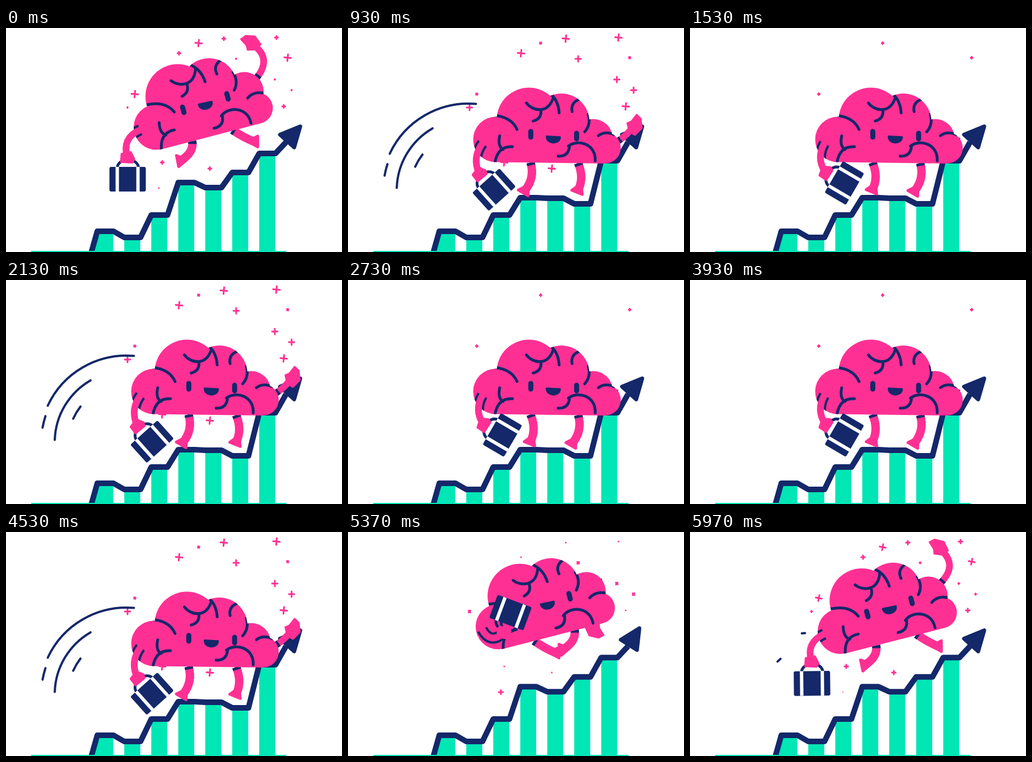
An HTML page with a canvas that plays this animation: 600 by 400 pixels, repeating every 6010 ms.

```html
<!DOCTYPE html>
<html lang="en">
<head>
<meta charset="utf-8">
<title>Running brain</title>
<style>
html, body { margin: 0; width: 100%; height: 100%; overflow: hidden; background: #fff; }
canvas { display: block; width: 600px; height: 400px; }
</style>
</head>
<body>
<canvas id="stage" width="600" height="400"></canvas>
<script>
const ctx = document.getElementById('stage').getContext('2d');
const PINK = '#ff3094', NAVY = '#14286a', GREEN = '#00e6b5';
const LOOP = 6010, CYCLE = 36, RAD = Math.PI / 180;

const mix = (a, b, t) => a + (b - a) * t;
const blend = (a, b, t) => a.map((v, i) => mix(v, b[i], t));

// Each lobe has a centre in the air and on the ground; creases are local to it.
const lobes = [
  { air: [267, 177], ground: [264, 199], r: 40.5, creases: [
    [-17, -40, 16, -47, 32, -27], [5, -8, 6, 11, 17, 14], [32, 5, 7, 10, 9, 39]] },
  { air: [305, 122], ground: [323, 164], r: 57.5, eye: [10, 24], creases: [
    [-12, -28, 0, -18, 30, -16, 32, -50], [25, -55, 42, -47, 49, -26], [16, -23, 22, -8, 8, 0]] },
  { air: [361, 104], ground: [381, 167], r: 50, eye: [33, 18], mouth: [-7, 29], creases: [
    [20, -46, 7, -36, 14, -22], [43, -25, 53, -9, 45, 7]] },
  { air: [424, 113], ground: [438, 197], r: 34.5, creases: [] },
  { air: [447, 143], ground: [459, 214], r: 28, creases: [
    [-17, -18, -7, -30, 10, -27], [-77, 36, -59, 32, -62, 14], [-64, 14, -52, -3, -17, -3, -11, 27]] }
];
const joints = {
  armL: [[238, 182], [240, 206]], armR: [[446, 89], [482, 202]],
  legL: [[331, 202], [326, 240]], legR: [[403, 182], [411, 241]]
};
const barTops = [363, 374, 334, 276, 285, 258, 224];
const barDips = [0, 0, 0, 27, 19, 56, 13];

// x, y and the frame at which the sparkle is largest
const sparkles = [
  [344, 27, 1], [503, 53, 1], [230, 118, 1],
  [389, 19, 29], [483, 17, 29], [309, 45, 29], [496, 140, 29], [279, 240, 29], [364, 251, 29],
  [411, 55, 25], [480, 92, 25], [510, 111, 25], [217, 142, 25],
  [273, 286, 12]
];

// Everything about the stride that follows from the frame alone
function stride(f) {
  const wave = Math.cos(f * 10 * RAD);
  const land = Math.sin((f - 1) * 10 * RAD) ** 4;
  const air = 1 - land;
  return { f, wave, land, air, dx: 1.5 * air, dy: -4.2 * (1 - wave) * air };
}

function joint(s, name) {
  const [x, y] = blend(...joints[name], s.land);
  return [x + s.dx, y + s.dy];
}

function poly(pts, color, round) {
  ctx.beginPath();
  pts.forEach(p => ctx.lineTo(p[0], p[1]));
  ctx.closePath();
  ctx.fillStyle = ctx.strokeStyle = color;
  ctx.fill();
  if (round) { ctx.lineWidth = round; ctx.stroke(); }
}

function curve(p, color, width, cap = 'round', dash = []) {
  ctx.beginPath();
  ctx.moveTo(p[0], p[1]);
  if (p.length === 8) ctx.bezierCurveTo(...p.slice(2));
  else ctx.quadraticCurveTo(...p.slice(2));
  ctx.strokeStyle = color;
  ctx.lineWidth = width;
  ctx.lineCap = cap;
  ctx.setLineDash(dash);
  ctx.stroke();
  ctx.setLineDash([]);
}

function at(x, y, deg, draw) {
  ctx.save();
  ctx.translate(x, y);
  ctx.rotate(deg * RAD);
  draw();
  ctx.restore();
}

function drawSparkles(f) {
  ctx.strokeStyle = PINK;
  ctx.lineCap = 'round';
  for (const [x, y, peak] of sparkles) {
    const d = (f - peak + CYCLE * 1.5) % CYCLE - CYCLE / 2;
    const size = 8 * (1 - Math.abs(d) / 15);
    if (size < .3) continue;
    const w = Math.min(3, size), r = Math.max(.1, size - w / 2);
    at(x, y, Math.max(0, -d) * 5.5, () => {
      ctx.lineWidth = w;
      ctx.beginPath();
      ctx.moveTo(-r, 0); ctx.lineTo(r, 0);
      ctx.moveTo(0, -r); ctx.lineTo(0, r);
      ctx.stroke();
    });
  }
}

function drawChart({ wave, land, air }) {
  const line = [[152, 402]];
  barTops.forEach((top, i) => {
    const x = 163 + i * 48.2, y = top + land * barDips[i];
    poly([[x, y], [x + 28.5, y], [x + 28.5, 399], [i ? x : 154, 399]], GREEN);
    line.push([x, y], [x + 29, y]);
  });
  line.push([500, 204]);
  ctx.beginPath();
  line.forEach(p => ctx.lineTo(p[0], p[1]));
  ctx.strokeStyle = NAVY;
  ctx.lineWidth = 10;
  ctx.lineCap = 'butt';
  ctx.stroke();
  at(500, 204, -48 - 5 * (1 - wave) * air, () => poly([[3, -17], [38, 0], [3, 17]], NAVY, 7));
  ctx.fillRect(45, 398, 456, 2);
}

// Arcs left by the bag: they sweep out, then shrink inwards as they fade.
function drawSwoosh(f) {
  if (f < 20) return;
  const grow = Math.min(1, (f - 19) / 8), out = Math.max(0, (f - 28) / 7);
  const arc = (r, from, span, rest) => {
    const len = mix(span * grow, rest, out);
    if (len <= 0) return;
    ctx.beginPath();
    ctx.arc(215, 290, r - 45 * out, (from - 10 * out) * RAD, (from - 10 * out - len) * RAD, true);
    ctx.strokeStyle = NAVY;
    ctx.lineWidth = 4;
    ctx.lineCap = 'round';
    ctx.stroke();
  };
  arc(155, 275, 70, 3);
  arc(128, 240, 58, 5);
  arc(104, 218, 14, -4);
  arc(152, 198, 8, -4);
}

// side is 1 for the left leg and -1 for the right, half a cycle apart.
function drawLeg(s, name, side) {
  const [x, y] = joint(s, name), w = s.wave * side;
  const fx = 9 - 30 * w - 14 * s.land, fy = 28 + 7 * w + 21 * s.land;
  const p = [x, y, x + fx / 2 + 7 + 7 * w + 5 * s.land, y + fy / 2 + 3, x + fx, y + fy];
  curve(p, PINK, 15, 'butt');
  curve(p, NAVY, 15, 'butt', [5, 999]);
  at(x + fx, y + fy, 25 * w - 3 - 28 * s.land, () => poly([[-10, -6], [10, -6], [1, 11]], PINK, 5));
}

// Curve from the shoulder to a hand at the given angle and reach
function armPath([x, y], deg, reach, bend) {
  const c = Math.cos(deg * RAD), n = Math.sin(deg * RAD);
  return [x, y, x + c * reach / 2 - n * bend, y + n * reach / 2 + c * bend, x + c * reach, y + n * reach];
}

function drawBackArm(s) {
  const turn = -10 * s.f;
  const p = armPath(joint(s, 'armR'), turn - 100 + 25 * Math.sin(s.f * 10 * RAD),
    78 - 15 * s.wave - 34 * s.land, 22 + 14 * s.wave - 20 * s.land);
  curve(p, PINK, 12, 'butt');
  curve(p, NAVY, 12, 'butt', [6, 999]);
  at(p[4], p[5], turn, () =>
    poly([[-17, -7], [-9, -13], [8, -12], [18, 2], [11, 11], [-5, 12], [-7, 4]], PINK, 3));
}

// The bag arm speeds up through a full turn, overshoots and settles.
function drawBagArm(s, outline) {
  const t = Math.min(1, s.f / 28), u = Math.max(0, (s.f - 28) / 8), settle = 1 - (1 - u) ** 2;
  const deg = 115 - 379 * t ** 2.57 + 19 * settle;
  const tilt = -402 * t ** 1.85 + 42 * settle;
  const p = armPath(joint(s, 'armL'), deg, 46 + 8 * s.wave + 7 * s.land, 24 - 8 * s.land);
  at(p[4], p[5], tilt, () => {
    ctx.strokeStyle = NAVY;
    ctx.lineWidth = 5;
    ctx.beginPath();
    ctx.ellipse(1, 19, 19, 15, 0, Math.PI, 0);
    ctx.stroke();
    poly([[-29, 20], [30, 20], [30, 58], [-29, 58]], NAVY, 6);
    ctx.fillStyle = '#fff';
    ctx.fillRect(-21, 17, 6, 44);
    ctx.fillRect(16, 17, 6, 44);
  });
  ctx.save();
  ctx.clip(outline);
  curve(p, NAVY, 20, 'butt');
  ctx.restore();
  curve(p, PINK, 12);
  at(p[4], p[5], tilt, () => poly([[-10, -6], [6, -9], [12, 3], [9, 9], [-11, 8]], PINK, 4));
}

function brainOutline(balls, land) {
  const path = new Path2D(), down = mix(75, 90, land) * RAD;
  const under = ([x, y], r) => [x + r * Math.cos(down), y + r * Math.sin(down)];
  const last = lobes.length - 1;
  const hull = [...balls, under(balls[last], lobes[last].r), under(balls[0], lobes[0].r)];
  hull.forEach(p => path.lineTo(p[0], p[1]));
  path.closePath();
  balls.forEach(([x, y], i) => {
    path.moveTo(x + lobes[i].r, y);
    path.arc(x, y, lobes[i].r, 0, 2 * Math.PI);
  });
  return path;
}

function drawMouth() {
  ctx.beginPath();
  ctx.moveTo(-12, 1);
  ctx.lineTo(12, 1);
  ctx.bezierCurveTo(12, 15, -12, 15, -12, 1);
  ctx.closePath();
  ctx.fillStyle = ctx.strokeStyle = NAVY;
  ctx.lineWidth = 3;
  ctx.fill();
  ctx.stroke();
}

function drawBrain({ land, dx, dy }) {
  const balls = lobes.map(l => {
    const [x, y] = blend(l.air, l.ground, land);
    return [x + dx, y + dy];
  });
  const outline = brainOutline(balls, land);
  ctx.fillStyle = PINK;
  ctx.fill(outline);
  ctx.save();
  ctx.clip(outline);
  lobes.forEach((l, i) => at(...balls[i], 15 * land, () => {
    l.creases.forEach(c => curve(c, NAVY, 5));
    if (l.eye) at(...l.eye, -15, () => curve([0, -5, 0, 0, 0, 5], NAVY, 9));
    if (l.mouth) at(...l.mouth, -12, drawMouth);
  }));
  ctx.restore();
  return outline;
}

function draw(f) {
  const s = stride(f);
  ctx.fillStyle = '#fff';
  ctx.fillRect(0, 0, 600, 400);
  ctx.lineJoin = 'round';
  drawSparkles(f);
  drawSwoosh(f);
  drawChart(s);
  drawBackArm(s);
  drawLeg(s, 'legR', -1);
  drawLeg(s, 'legL', 1);
  drawBagArm(s, drawBrain(s));
}

const start = performance.now();
function tick() {
  const t = Math.max(0, performance.now() - start) % LOOP;
  const step = Math.min(179, Math.floor((t + 4) / 33.3334));
  draw(step % CYCLE);
  requestAnimationFrame(tick);
}
tick();
</script>
</body>
</html>
```
